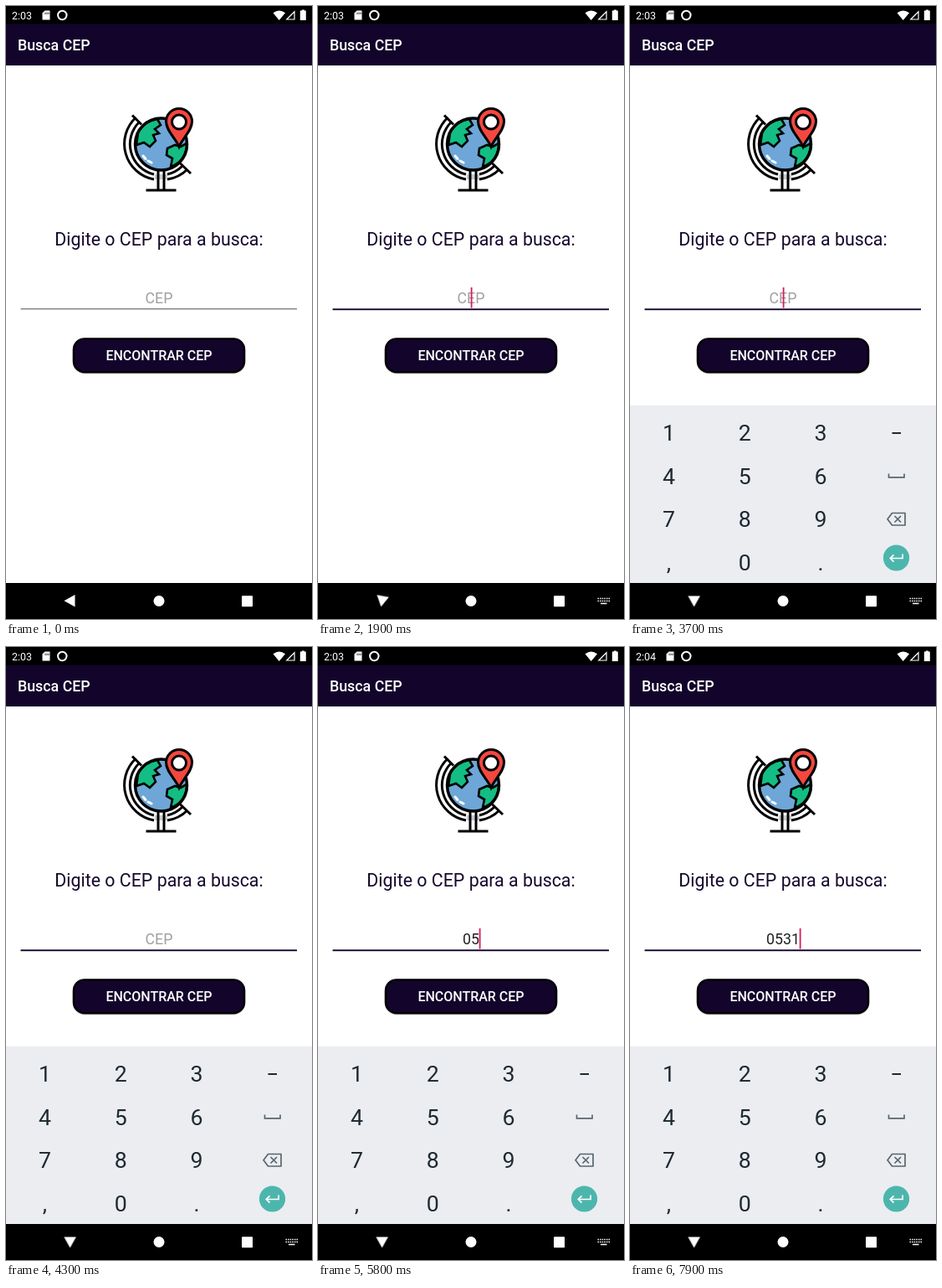
An HTML page for the animation above (8 s loop, 366x732 px).

```html
<!DOCTYPE html>
<html lang="pt-BR">
<head>
<meta charset="utf-8">
<title>Busca CEP</title>
<style>
  html, body { margin: 0; width: 100%; height: 100%; overflow: hidden; background: #fff; }
  svg { display: block; width: 100%; height: 100%; }
  text { font-family: Roboto, sans-serif; }
  .mid { text-anchor: middle; }
  .medium { font-weight: 500; fill: #fff; }
  .field { font-size: 17.8px; text-anchor: middle; fill: #222; }
  .keys text { font-size: 26.7px; text-anchor: middle; fill: #1d2930; }
  .line { fill: none; stroke: #000; stroke-width: 3; }

  /* One shared 8 s timeline: 1% = 80 ms */
  .step { animation: 8s step-end infinite; }
  .off { opacity: 0; }
  .before { animation-name: before; }
  .after { animation-name: after; }
  .blur { animation-name: blur; }
  .focus { animation-name: focus; }
  .hint { animation-name: hint; }
  .typed1 { animation-name: typed1; }
  .typed2 { animation-name: typed2; }
  .typed3 { animation-name: typed3; }
  .typed4 { animation-name: typed4; }
  .press0 { animation-name: press0; }
  .press5 { animation-name: press5; }
  .press3 { animation-name: press3; }
  .blink { animation-name: blink; }
  .caret { animation-name: caret; }
  .back { transform-origin: 76.7px 710.3px; animation: back 8s infinite; }
  .keyboard { animation: rise 8s infinite; }

  @keyframes before { 0% { opacity: 1 } 83.5% { opacity: 0 } }
  @keyframes after { 83.5% { opacity: 1 } 100% { opacity: 1 } }
  @keyframes blur { 0% { opacity: 1 } 22.4% { opacity: 0 } }
  @keyframes focus { 22.4% { opacity: 1 } 100% { opacity: 1 } }
  @keyframes hint { 0% { opacity: 1 } 61% { opacity: 0 } }
  @keyframes typed1 { 61% { opacity: 1 } 69.5% { opacity: 0 } }
  @keyframes typed2 { 69.5% { opacity: 1 } 83.5% { opacity: 0 } }
  @keyframes typed3 { 83.5% { opacity: 1 } 93.5% { opacity: 0 } }
  @keyframes typed4 { 93.5% { opacity: 1 } 100% { opacity: 1 } }
  @keyframes press0 { 59.5% { opacity: 1 } 61.5% { opacity: 0 } }
  @keyframes press5 { 68.2% { opacity: 1 } 70.5% { opacity: 0 } }
  @keyframes press3 { 81.9% { opacity: 1 } 83.5% { opacity: 0 } }
  @keyframes blink {
    22.4%, 30.5%, 43%, 55.5%, 69.5%, 82%, 93.5%, 100% { opacity: 1 }
    0%, 28.6%, 36.75%, 49.25%, 67.25%, 75.75%, 89.75% { opacity: 0 }
  }
  @keyframes caret {
    0% { transform: none }
    61% { transform: translateX(5px) }
    69.5% { transform: translateX(10px) }
    83.5% { transform: translateX(15px) }
    93.5%, 100% { transform: translateX(20px) }
  }
  @keyframes back {
    0%, 22.5% { transform: none; animation-timing-function: cubic-bezier(.33, .67, .67, 1) }
    24.4%, 100% { transform: rotate(-90deg) }
  }
  @keyframes rise {
    0%, 29.375% { opacity: 0; transform: translateY(62px); animation-timing-function: cubic-bezier(.33, .67, .67, 1) }
    32.5%, 100% { opacity: 1; transform: none }
  }
</style>
</head>
<body>
<svg viewBox="0 0 366 732">
  <rect width="366" height="732" fill="#fff"/>

  <!-- Status bar and header -->
  <rect width="366" height="22" fill="#000"/>
  <rect y="21.5" width="366" height="49.5" fill="#13042b"/>
  <g fill="#fff" font-size="12.4">
    <text class="step before" x="7" y="15.5">2:03</text>
    <text class="step after off" x="7" y="15.5">2:04</text>
    <path d="M46.5 5.5h6v11h-9v-8z"/>
    <path d="M47 7.5v2.5M49 7.5v2.5M51 7.5v2.5" stroke="#000" stroke-width=".8"/>
    <circle cx="67.3" cy="11" r="5.2" fill="none" stroke="#fff" stroke-width="2"/>
    <path d="M319.5 8.2Q326.7 2.8 334 8.2L326.7 17z"/>
    <path d="M345 6.8V16H335.8z" fill="none" stroke="#fff" stroke-width="1.2"/>
    <path d="M353.8 5.5v-1h3v1h2v11.5h-7V5.500z"/>
  </g>
  <text class="medium" x="14" y="53" font-size="17.8">Busca CEP</text>

  <!-- Globe on its stand -->
  <g class="line">
    <path d="M178 201h15v6h-15z" fill="#c9cbd2" stroke="none"/>
    <path d="M155.500 133A43 43 0 0 0 177 207M193 207A43 43 0 0 0 217 195"/>
    <path d="M160 138A37 37 0 0 0 177 201M193 201A37 37 0 0 0 211 191"/>
    <path d="M151 130.500l11 11M207 186.500l14 13.500"/>
    <path d="M182 196v23M189 196v23"/>
    <path d="M167.500 220h36"/>
    <circle cx="185.500" cy="165" r="31" fill="#6ea6d8" stroke="none"/>
    <path d="M158 151Q166 137 181 135L185 142L178 147L183 152L176 154L179 161L172 168L165 163L156 166Z" fill="#13bd83" stroke-width="2.6"/>
    <path d="M216 164L209 168L202 166L193 170L192 178L199 182L197 192Q214 186 216.500 167Z" fill="#13bd83" stroke-width="2.6"/>
    <circle cx="185.500" cy="165" r="31" stroke-width="3.5"/>
    <path d="M164 179l3 3.500M170 185l4 2" stroke="#fff" stroke-linecap="round"/>
    <path d="M207 168C203 158 191.500 149 191.500 138A15.500 15.500 0 0 1 222.500 138C222.500 149 211 158 207 168Z" fill="#f4473f"/>
    <circle cx="207" cy="138.500" r="8.500" fill="#fff"/>
  </g>

  <!-- Form -->
  <text class="mid" x="183" y="286" font-size="21.37" fill="#16082c">Digite o CEP para a busca:</text>
  <rect class="step blur" x="17.500" y="361.300" width="330.500" height="1" fill="#4d4d52"/>
  <rect class="step focus off" x="17.500" y="361.300" width="330.500" height="1.900" fill="#13042b"/>
  <g class="field">
    <text class="step hint" x="183" y="355" fill="#a0a0a0">CEP</text>
    <text class="step typed1 off" x="183" y="355">0</text>
    <text class="step typed2 off" x="183" y="355">05</text>
    <text class="step typed3 off" x="183" y="355">053</text>
    <text class="step typed4 off" x="183" y="355">0531</text>
  </g>
  <g class="step caret">
    <rect class="step blink off" x="182.700" y="336" width="1.800" height="24.500" fill="#d81b60"/>
  </g>
  <rect x="80" y="398.500" width="206" height="41" rx="14" fill="#000" opacity=".13"/>
  <rect x="80.900" y="397.400" width="204.200" height="39.800" rx="13" fill="#13042b" stroke="#000" stroke-width="2.400"/>
  <text class="medium mid" x="183" y="422.500" font-size="16.030">ENCONTRAR CEP</text>

  <!-- Navigation bar -->
  <rect y="689" width="366" height="43" fill="#000"/>
  <g fill="#fff">
    <path class="back" d="M69.500 710.300L82.500 703V717.600Z"/>
    <circle cx="183" cy="710.500" r="6.500"/>
    <rect x="282" y="704.300" width="13" height="13" rx=".8"/>
    <g class="step focus off" fill="none" stroke="#fff" stroke-width="1.500">
      <path d="M334.500 707.500H349M334.500 710.500H349" stroke-dasharray="1.500 1.100"/>
      <path d="M338 713.500h7.500"/>
    </g>
  </g>

  <!-- Numeric keyboard -->
  <g class="keyboard">
    <rect y="477" width="366" height="212" fill="#ebedf1"/>
    <g fill="#d9dce0">
      <rect class="step press0 off" x="91.500" y="637.500" width="91" height="51.500"/>
      <rect class="step press5 off" x="91.500" y="534.500" width="91" height="51.500"/>
      <rect class="step press3 off" x="182.500" y="483" width="91" height="51.500"/>
    </g>
    <g class="keys">
      <text x="46.500" y="519">1</text><text x="137.300" y="519">2</text><text x="228" y="519">3</text>
      <text x="46.500" y="570.700">4</text><text x="137.300" y="570.700">5</text><text x="228" y="570.700">6</text>
      <text x="46.500" y="622.300">7</text><text x="137.300" y="622.300">8</text><text x="228" y="622.300">9</text>
      <text x="46.500" y="674">,</text><text x="137.300" y="674">0</text><text x="228" y="674">.</text>
    </g>
    <path d="M313.500 510h10.500" stroke="#1d2930" stroke-width="2"/>
    <g fill="none" stroke="#5a666d" stroke-width="1.700">
      <path d="M309.500 558.500v4.300h18.500v-4.300"/>
      <path d="M313.500 605.500H329V620H313.500L308 612.750Z" stroke-linejoin="round"/>
      <path d="M316.500 609l7.500 7.500M324 609l-7.500 7.500"/>
    </g>
    <circle cx="318.500" cy="659" r="15.600" fill="#4db6ac"/>
    <path d="M326 654.500V659.500H311.500M315.500 655.300L311.300 659.500L315.500 663.700" fill="none" stroke="#fff" stroke-width="1.700"/>
  </g>
</svg>
</body>
</html>
```
